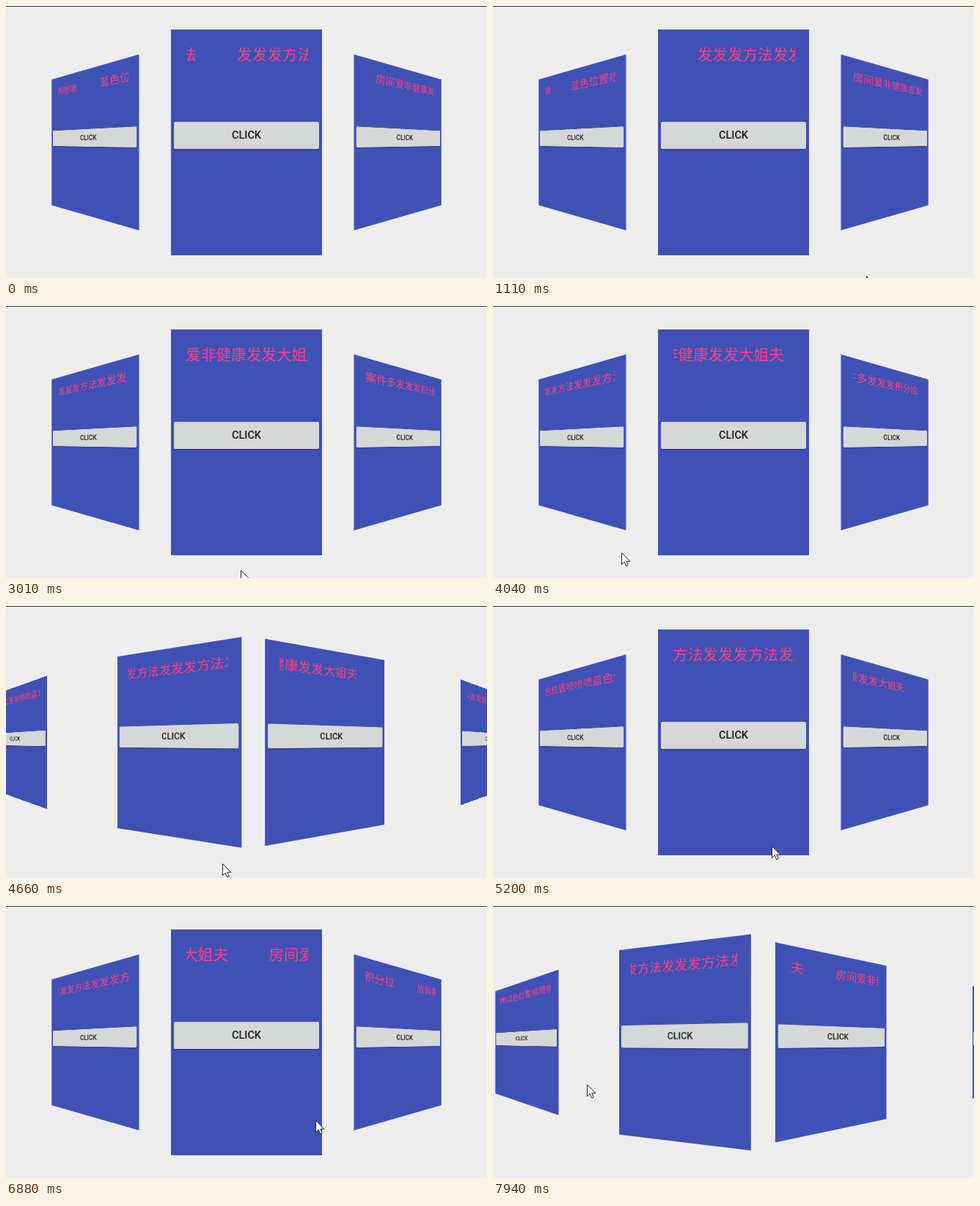
These frames come from a looping animation (656x371 px, 7.99 s). An HTML page:

```html
<!DOCTYPE html>
<html lang="zh-CN">
<head>
<meta charset="utf-8">
<title>Card carousel</title>
<style>
  html, body { margin: 0; width: 100%; height: 100%; overflow: hidden; background: #ededed; }
  #stage { position: relative; width: 656px; height: 371px; overflow: hidden; }
  #stage::before { content: ""; position: absolute; left: 0; top: 0; width: 100%; height: 1px; background: #2a3845; }
  .card { position: absolute; left: 224.5px; top: 32px; width: 206px; height: 308px; background: #3f51b5; }
  .marquee { position: absolute; left: 20.5px; top: 18.3px; width: 166.5px; height: 30px; overflow: hidden;
    font: 20.6px/30px "Noto Sans CJK SC", "Noto Sans CJK", sans-serif; color: #ff4081; white-space: nowrap; }
  .track { position: absolute; left: 0; top: 0; display: flex; }
  .track span { margin-right: 55.5px; }
  .button { position: absolute; left: 4.3px; top: 126px; width: 197.4px; height: 37px; border-radius: 2px;
    background: #d6d7d7; box-shadow: 0 1px 1.5px rgba(0, 0, 0, .38); text-align: center;
    font: 500 14.5px/38px Roboto, sans-serif; color: #1b1b1b; }
  #cursor { position: absolute; left: 0; top: 0; width: 13px; height: 20px; }
</style>
</head>
<body>
<div id="stage">
  <svg id="cursor" viewBox="0 0 13 20">
    <path d="M.5 .7V16.6L4.2 13.1L6.7 18.9L9.2 17.8L6.8 12.2H11.9Z" fill="#fff" stroke="#20202c"/>
  </svg>
</div>
<script>
const LOOP = 7990;
const PAGE_STEP = 216, PERSPECTIVE = 202;
const FONT_SIZE = 20.6, GAP = 55.5, SPEED = 0.033, PAUSE = 1200;

// lead: distance the text still has to travel before it rests at the left edge
const pages = [
  { text: "蓝色位置喷喷喷".repeat(2), lead: 109.5 },
  { text: "发发发方法".repeat(4), lead: 70 },
  { text: "房间爱非健康发发大姐夫", lead: 18.5 },
  { text: "放假案件多发发发积分拉", lead: 18.5 },
];

const drag = k => k ** 1.3;
const fling = k => 1 - (1 - k) ** 7;
const smooth = k => k * k * (3 - 2 * k);

// Each swipe moves the carousel by one page.
const swipes = [
  { from: 2240, to: 2900, step: 1, ease: drag },
  { from: 4120, to: 4993, step: -1, ease: drag },
  { from: 6545, to: 6870, step: 1, ease: fling },
  { from: 7650, to: 8050, step: -1, ease: drag },
];

const cursorStops = [
  { at: 900, x: 510, y: 372 },
  { at: 2230, x: 497, y: 320 },
  { at: 3010, x: 320, y: 360 },
  { at: 4130, x: 172, y: 336 },
  { at: 4660, x: 295, y: 351 },
  { at: 5970, x: 524, y: 285 },
  { at: 6880, x: 422, y: 292 },
  { at: 7940, x: 128, y: 243 },
];

const progress = (t, from, to) => Math.min(1, Math.max(0, (t - from) / (to - from)));

const scrollAt = t =>
  swipes.reduce((sum, s) => sum + s.step * s.ease(progress(t, s.from, s.to)), 0);

function cursorAt(t) {
  let { x, y } = cursorStops[0];
  for (let i = 1; i < cursorStops.length; i++) {
    const a = cursorStops[i - 1], b = cursorStops[i];
    const k = smooth(progress(t, a.at, b.at));
    x += (b.x - a.x) * k;
    y += (b.y - a.y) * k;
  }
  return [Math.round(x), Math.round(y)];
}

function marqueeX(lead, t) {
  const arrival = lead / SPEED;
  return t < arrival ? lead - SPEED * t : -Math.max(0, t - arrival - PAUSE) * SPEED;
}

const stage = document.getElementById("stage");
const cursor = document.getElementById("cursor");

for (const page of pages) {
  const card = document.createElement("div");
  card.className = "card";
  card.innerHTML = `<div class="marquee"><div class="track">${`<span>${page.text}</span>`.repeat(3)}</div></div>
    <div class="button">CLICK</div>`;
  stage.insertBefore(card, cursor);
  page.card = card;
  page.track = card.querySelector(".track");
  page.period = page.text.length * FONT_SIZE + GAP;
}

function draw(t) {
  const scroll = scrollAt(t);
  pages.forEach((page, i) => {
    const p = i - 1 - scroll;
    page.card.style.transform = `translateX(${p * PAGE_STEP}px) perspective(${PERSPECTIVE}px)
      rotateY(${30 * p}deg) scale(${1 - .35 * Math.abs(p)})`;
    page.track.style.transform = `translateX(${marqueeX(page.lead, t) - page.period}px)`;
  });
  const [x, y] = cursorAt(t);
  cursor.style.transform = `translate(${x}px, ${y}px)`;
}

const start = performance.now();
function frame() {
  draw((performance.now() - start) % LOOP);
  requestAnimationFrame(frame);
}
frame();
</script>
</body>
</html>
```
